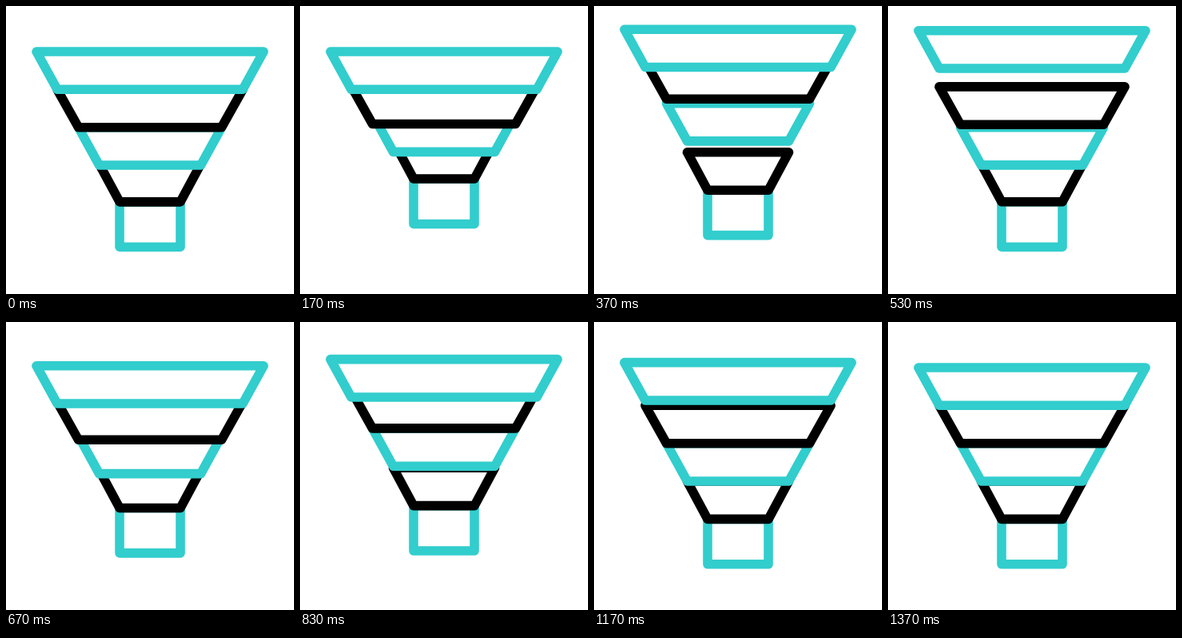
These frames come from a looping animation (360 by 360 pixels, 1670 ms). An HTML page:

```html
<!DOCTYPE html>
<html lang="en">
<head>
<meta charset="utf-8">
<title>Funnel</title>
<style>
  html, body { margin: 0; height: 100%; overflow: hidden; background: #fff; }
  svg { display: block; width: 100vw; height: 100vh; }
  path { fill: #fff; stroke-width: 11.6; stroke-linejoin: round; }
</style>
</head>
<body>
<svg id="stage" viewBox="0 0 360 360"></svg>
<script>
const LOOP = 1670, FRAME = 100 / 3;
const CYAN = '#32cdcd', BLACK = '#000';
const HEIGHTS = [0, -36, 0, -19.5, 0];

// Listed from back to front; keys are the frames of start, peak, landing, second peak, end.
const parts = [
  { color: CYAN, top: 246.4, bottom: 302.8, left: [142, 142], keys: [-1, 7, 14.5, 23, 31.5] },
  { color: BLACK, top: 199, bottom: 246.4, left: [116.5, 142], keys: [-1, 7, 14.5, 23, 31.5] },
  { color: CYAN, top: 151.7, bottom: 199, left: [90.5, 116.5], keys: [1.2, 9.2, 16.2, 24, 32.7] },
  { color: BLACK, top: 104.3, bottom: 151.7, left: [64, 90.5], keys: [3.5, 10.5, 17.3, 26, 34.6] },
  { color: CYAN, top: 57, bottom: 104.3, left: [38, 64], keys: [5.9, 13.3, 21.2, 28.5, 39] },
];

for (const part of parts) {
  const { color, top, bottom, left: [a, b] } = part;
  part.path = document.createElementNS('http://www.w3.org/2000/svg', 'path');
  part.path.setAttribute('d', `M${a} ${top}H${360 - a}L${360 - b} ${bottom}H${b}Z`);
  part.path.setAttribute('stroke', color);
  stage.append(part.path);
}

const smooth = p => p * p * (3 - 2 * p);

function offset(keys, frame) {
  const i = keys.findIndex(key => frame < key);
  if (i < 1) return 0;
  const p = smooth((frame - keys[i - 1]) / (keys[i] - keys[i - 1]));
  return HEIGHTS[i - 1] + (HEIGHTS[i] - HEIGHTS[i - 1]) * p;
}

function draw() {
  const frame = Math.floor((performance.now() % LOOP + 4) / FRAME);
  for (const { path, keys } of parts)
    path.setAttribute('transform', `translate(0 ${offset(keys, frame)})`);
  requestAnimationFrame(draw);
}
draw();
</script>
</body>
</html>
```
